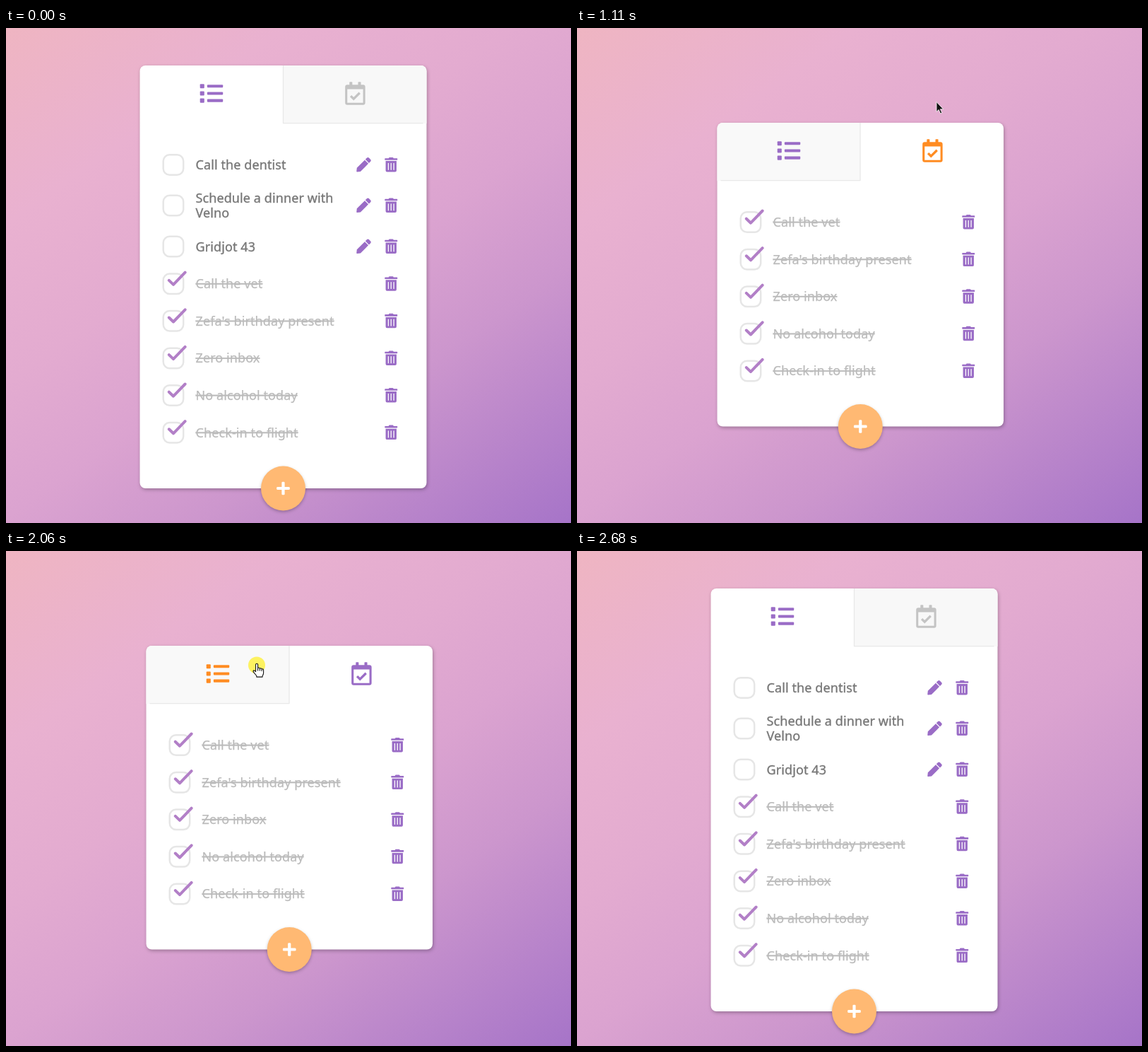
Write an HTML page that moves like this. It is 800 px wide and 700 px high and loops after 3.49 s.

```html
<!DOCTYPE html>
<html lang="en">
<head>
<meta charset="utf-8">
<title>To-do list</title>
<style>
  html, body { margin: 0; width: 100%; height: 100%; overflow: hidden; }
  body {
    background: linear-gradient(145deg, #efb5c2 0%, #e9b1d0 22%, #e3abd0 40%,
      #dba3d0 55%, #cc96cd 71%, #a674c8 100%);
  }
  svg { display: block; width: 800px; height: 700px; }
  text {
    font: 500 18px "Noto Sans", "Open Sans", sans-serif;
    letter-spacing: .1px;
    fill: #777;
    stroke: #777;
    stroke-width: .35;
  }
  .done { fill: #bbb; stroke: #bbb; stroke-width: .25; text-decoration: line-through; }
  .card { fill: #fff; filter: drop-shadow(1px 2px 2.5px rgba(0, 0, 0, .28)); }
  .fab { fill: #ffb973; filter: drop-shadow(0 2px 2px rgba(0, 0, 0, .25)); }
  .tool { fill: #9a6cc6; fill-rule: evenodd; }
  .box { fill: #fff; stroke: #e6e6e6; stroke-width: 2.5; }
  .check { fill: none; stroke: #b27fc7; stroke-width: 4; stroke-linecap: round; stroke-linejoin: round; }
  .line { fill: none; stroke: #e8e8e8; stroke-width: 1.3; }
</style>
</head>
<body>
<svg viewBox="0 0 800 700">
  <defs>
    <path id="trash" d="M32 464a48 48 0 0 0 48 48h288a48 48 0 0 0 48-48V128H32z
      m272-256a16 16 0 0 1 32 0v224a16 16 0 0 1-32 0z
      m-96 0a16 16 0 0 1 32 0v224a16 16 0 0 1-32 0z
      m-96 0a16 16 0 0 1 32 0v224a16 16 0 0 1-32 0z
      M432 32H312l-9-19A24 24 0 0 0 281 0H167a24 24 0 0 0-22 13L136 32H16A16 16 0 0 0 0 48v32
      a16 16 0 0 0 16 16h416a16 16 0 0 0 16-16V48a16 16 0 0 0-16-16z"/>
    <path id="pen" d="M291 93l128 128-278 278-114 13C11 514-2 501 0 485l13-114z
      M498 74l-60-60c-19-19-49-19-68 0l-57 57 128 128 57-57c19-19 19-49 0-68z"/>
    <g id="list" fill="currentColor"></g>
    <g id="calendar" fill="currentColor">
      <path fill-rule="evenodd" d="M48 64h352a48 48 0 0 1 48 48v352a48 48 0 0 1-48 48H48
        a48 48 0 0 1-48-48V112a48 48 0 0 1 48-48zM48 160v304h352V160z"/>
      <rect x="96" width="64" height="90" rx="12"/>
      <rect x="288" width="64" height="90" rx="12"/>
      <path d="M124 311l66 66 134-133" fill="none" stroke="currentColor" stroke-width="52"/>
    </g>
  </defs>
  <g id="all"></g>
  <g id="completed"></g>
  <g id="pointer">
    <circle id="press" cy="2" r="12" fill="#ffee10" opacity=".65"/>
    <path id="arrow" d="M0 0V14L3.2 11 5.6 16.5 7.8 15.6 5.4 10.3H9.7Z"
      fill="#111" stroke="#fff" stroke-width=".8"/>
    <path id="hand" d="M-1.4 11V1.2a1.5 1.5 0 0 1 3 0V6q1.5-1.2 2.7.6q1.6-1 2.7.7
      q2.6-.6 2.6 2V13q0 2-1.5 4v1.6H-.2V17L-4.8 11.4q-.6-2 1.2-2Z
      M1.6 6V10M4.4 6.8V10M7.1 7.5V10.4"
      fill="#fff" stroke="#111" stroke-width="1.1" stroke-linejoin="round"/>
  </g>
</svg>
<script>
const LOOP = 3490, TO_DONE = 1110, TO_ALL = 2090, FADE = 300;
const PURPLE = [154, 108, 198], GRAY = [196, 196, 196], ORANGE = [255, 140, 34];
const ROW = 52.6;
const open = [['Call the dentist'], ['Schedule a dinner with', 'Velno'], ['Gridjot 43']];
const done = ['Call the vet', "Zefa's birthday present", 'Zero inbox', 'No alcohol today', 'Check-in to flight'];
const $ = id => document.getElementById(id);

$('list').innerHTML = [48, 208, 368].map(y =>
  `<rect y="${y}" width="96" height="96" rx="16"/>
   <rect x="160" y="${y + 16}" width="352" height="64" rx="16"/>`).join('');

const icon = (name, x, y) =>
  `<use href="#${name}" class="tool" transform="translate(${x} ${y - 10.5}) scale(.04)"/>`;

function row(lines, y, isDone) {
  const first = y + 6.5 - (lines.length - 1) * 10.5;
  const label = lines.map((line, i) =>
    `<text x="79" y="${first + i * 21}" class="${isDone ? 'done' : ''}">${line}</text>`).join('');
  const mark = isDone
    ? `<path class="check" d="M41.3 ${y - 4.8}l6.2 6 16.6-17.2"/>`
    : icon('pen', 306.8, y);
  return `<rect class="box" x="33.2" y="${y - 14.2}" width="28.5" height="28.5" rx="9"/>
    ${mark}${label}${icon('trash', 346.8, y)}`;
}

const doneRows = top => done.map((text, i) => row([text], top + i * ROW, true)).join('');

function card(id, x, y, width, height, tab, rows) {
  const mid = width / 2;
  $(id).setAttribute('transform', `translate(${x} ${y})`);
  $(id).innerHTML = `<rect class="card" width="${width}" height="${height}" rx="8"/>${tab}
    <use href="#list" class="list" transform="translate(85.2 23.2) scale(.0635)"/>
    <use href="#calendar" class="calendar" transform="translate(290.7 23.3) scale(.0635)"/>
    ${rows}
    <g transform="translate(${mid} ${height})" fill="#fff">
      <circle class="fab" r="31.5"/>
      <rect x="-9.3" y="-2.1" width="18.6" height="4.2" rx="1.4"/>
      <rect x="-2.1" y="-9.3" width="4.2" height="18.6" rx="1.4"/>
    </g>`;
}

card('all', 189.5, 53, 406, 598,
  `<path fill="#f8f8f8" d="M203 0H398a8 8 0 0 1 8 8V82H203Z"/><path class="line" d="M203 0V81.7H401"/>`,
  [140.5, 198, 256].map((y, i) => row(open[i], y, false)).join('') + doneRows(308.7));
card('completed', 198.5, 134, 405.5, 429.5,
  `<path fill="#f9f9f9" d="M202.5 0H8a8 8 0 0 0-8 8V82H202.5Z"/><path class="line" d="M202.5 0V81.7H5"/>`,
  doneRows(140.5));

const linear = p => p;
const smooth = p => p * p * (3 - 2 * p);
const easeOut = p => 1 - (1 - p) ** 1.6;
const easeIn = p => p ** 1.5;

// [time, x, y, easing towards this point]
const path = [
  [100, 762, 690], [540, 610, 160, easeOut], [600, 592, 143, linear],
  [930, 509, 104.5, easeOut], [1140, 509, 104.5, linear], [1690, 355, 159.5, smooth],
  [TO_ALL, 355, 159.5, linear], [2510, 645, 180, easeIn], [2670, 808, 392, linear]
];

function pointerAt(t) {
  const i = Math.max(1, path.findIndex(k => k[0] > t));
  const [t0, x0, y0] = path[i - 1], [t1, x1, y1, ease] = path[i];
  const p = ease((t - t0) / (t1 - t0));
  return [x0 + (x1 - x0) * p, y0 + (y1 - y0) * p];
}

// Each change is [start time, colour]
function colorAt(t, start, changes) {
  let color = start;
  for (const [at, next] of changes) {
    const p = smooth(Math.min(1, Math.max(0, (t - at) / FADE)));
    color = color.map((c, i) => c + (next[i] - c) * p);
  }
  return `rgb(${color.map(Math.round)})`;
}

const show = (el, on) => { el.style.display = on ? '' : 'none'; };
const paint = (selector, color) =>
  document.querySelectorAll(selector).forEach(el => { el.style.color = color; });

function draw(t) {
  const onDone = t >= TO_DONE && t < TO_ALL;
  show($('all'), !onDone);
  show($('completed'), onDone);
  paint('.list', colorAt(t, PURPLE, [[TO_DONE, GRAY], [1480, ORANGE], [TO_ALL, PURPLE]]));
  paint('.calendar', colorAt(t, GRAY, [[650, ORANGE], [TO_DONE, PURPLE], [TO_ALL, GRAY]]));

  const visible = t >= 100 && t < 2670;
  show($('pointer'), visible);
  if (!visible) return;
  const [x, y] = pointerAt(t);
  const left = onDone ? 198.5 : 189.5, top = onDone ? 134 : 53;
  const overTab = x > left && x < left + 406 && y > top && y < top + 82;
  $('pointer').setAttribute('transform', `translate(${x} ${y})`);
  show($('hand'), overTab);
  show($('arrow'), !overTab);
  show($('press'), (t >= 1030 && t < TO_DONE) || (t >= 1990 && t < TO_ALL));
}

const begin = performance.now();
function tick() {
  draw((performance.now() - begin) % LOOP);
  requestAnimationFrame(tick);
}
tick();
</script>
</body>
</html>
```
